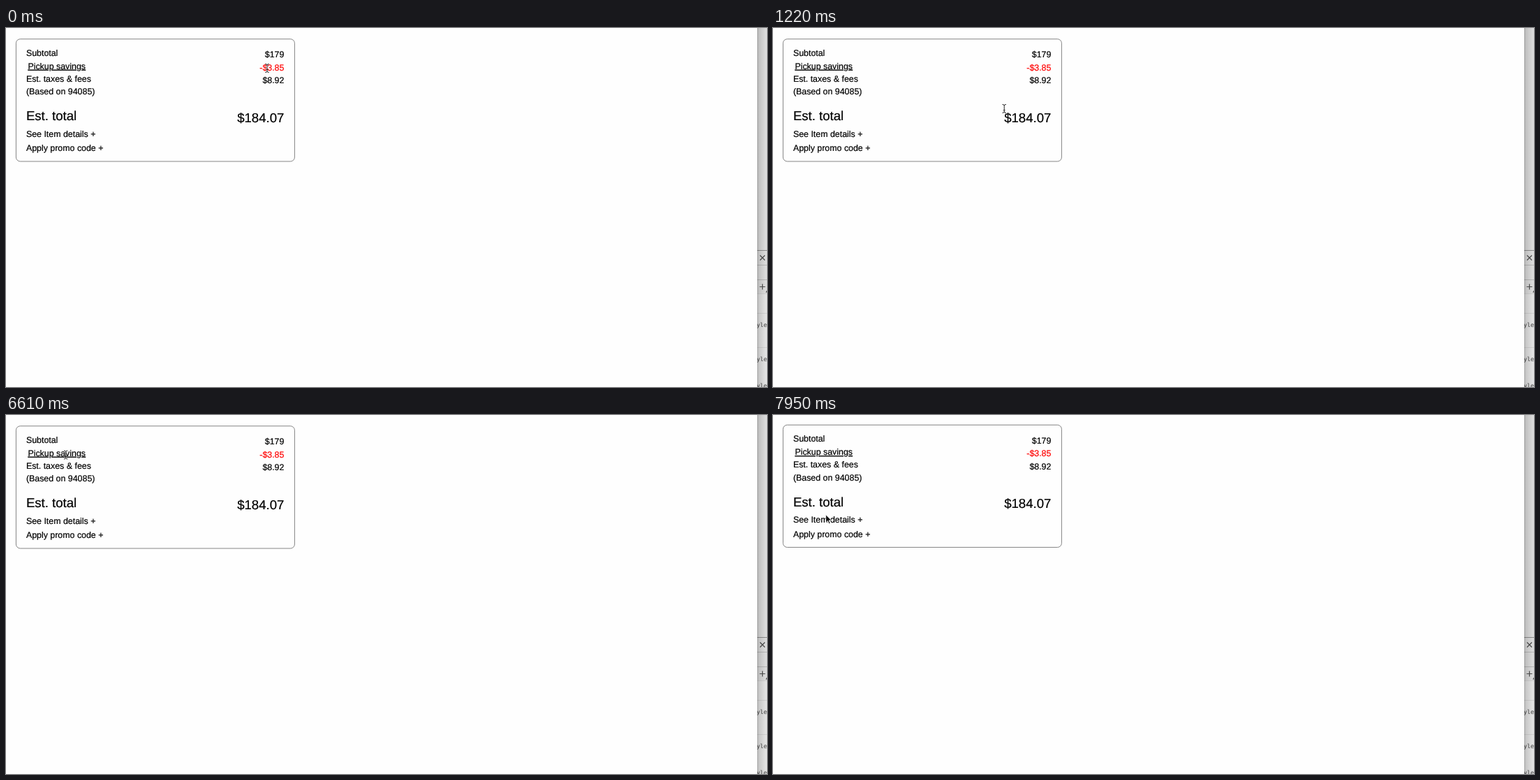
Write an HTML page that moves like this. It is 1090x514 px and loops after 8 s.

```html
<!DOCTYPE html>
<html lang="en">
<head>
<meta charset="utf-8">
<title>Order summary</title>
<style>
html, body { margin: 0; width: 100%; height: 100%; overflow: hidden; background: #fefefe; }
svg { display: block; }
text { font: 12.4px "Liberation Sans", Arial, sans-serif; text-rendering: geometricPrecision; white-space: pre; }
#card text { stroke: currentColor; stroke-width: .2; }
#card .saving { fill: #f00; color: #f00; }
.big { font-size: 18.6px; }
.end { text-anchor: end; }
.mid { text-anchor: middle; fill: #fff; }
.code { font: 8.4px "DejaVu Sans Mono", monospace; fill: #444; }
</style>
</head>
<body>
<svg width="1090" height="514" viewBox="0 0 1090 514">
  <defs>
    <linearGradient id="shade">
      <stop offset="0" stop-opacity=".34"/>
      <stop offset=".15" stop-opacity=".2"/>
      <stop offset="1" stop-opacity=".07"/>
    </linearGradient>
  </defs>
  <rect width="1090" height="514" fill="#fefefe"/>

  <!-- window behind the page -->
  <g>
    <rect x="1076" width="14" height="380" fill="#f0f0f0"/>
    <rect x="1076" y="380" width="14" height="134" fill="#f8f8f8"/>
    <path d="M1076 318.5h14" stroke="#999"/>
    <path d="M1076 339.5h14M1076 360.5h14" stroke="#c8c8c8"/>
    <path d="M1076 380.5h14M1076 408.5h14M1076 457.5h14" stroke="#e4e4e4"/>
    <path d="M1080 325.5l7 7m0-7l-7 7M1079.5 370.5h8m-4-4v8" stroke="#555" stroke-width="1.2"/>
    <path d="M1090 375.5v3h-2z" fill="#555"/>
    <text class="code" x="1075" y="428">yle</text>
    <text class="code" x="1075" y="476.5">yle</text>
    <text class="code" x="1075" y="514.5">yle</text>
    <rect x="1076" width="14" height="514" fill="url(#shade)"/>
  </g>
  <rect x="1060" width="16" height="514" fill="#fefefe"/>

  <g id="card">
    <rect x="14.4" y="15.8" width="399" height="175.2" rx="6" fill="none" stroke="#777" stroke-width=".9"/>
    <text x="28.9" y="40">Subtotal</text>
    <text x="31.4" y="58.7" text-decoration="underline">Pickup savings</text>
    <text x="28.9" y="77">Est. taxes &amp; fees</text>
    <text x="28.9" y="95.4">(Based on 94085)</text>
    <text x="28.9" y="132.3" class="big">Est. total</text>
    <text x="28.9" y="155.5">See Item details +</text>
    <text x="28.9" y="176.4">Apply promo code +</text>
    <g class="end">
      <text x="398.4" y="42.3">$179</text>
      <text x="398.4" y="61" class="saving">-$3.85</text>
      <text x="398.4" y="79.4">$8.92</text>
      <text x="398.4" y="134.9" class="big">$184.07</text>
    </g>
  </g>

  <g id="tip">
    <rect x="71" y="63" width="184.3" height="49.3" rx="4.5" fill="#808080"/>
    <text class="mid" x="163" y="79">Picking up your order in store</text>
    <text class="mid" x="163" y="92.8">helps cut cost, and we pass the</text>
    <text class="mid" x="163" y="106.6">saving on to you</text>
  </g>

  <g id="beam" fill="none">
    <path d="M0-5V5" stroke="#fff" stroke-opacity=".5" stroke-width="2.4"/>
    <path d="M-2.7-6Q0-6 0-4.5Q0-6 2.7-6M0-4.5V4.5M-2.7 6Q0 6 0 4.5Q0 6 2.7 6M-1.3 2.2H1.3" stroke="#222"/>
  </g>
  <path id="arrow" d="M0 0V11.2L2.7 8.8L4.6 13L6.5 12.2L4.7 8.1H8.2Z" fill="#111" stroke="#fff" stroke-width=".8"/>
</svg>
<script>
const LOOP = 8000, SCROLL = 0.78;
const [card, tip, beam, arrow] = ["card", "tip", "beam", "arrow"].map(id => document.getElementById(id));

// start time, pointer x, y, pointer kind
const steps = [
  [0, 374, 57.5, beam],
  [150, 371.3, 77.5, beam],
  [330, 371, 111.5, arrow],
  [470, 371.5, 119.5, beam],
  [620, 371.5, 124.5, beam],
  [770, 371, 131.5, beam],
  [920, 370.4, 131.5, beam],
  [1220, 331.2, 115.5, beam],
  [1370, 95, 57.5, beam],
  [1510, 85.5, 56, beam],
  [1810, 85.6, 57, beam],
  [7060, 77.5, 115.5, arrow],
  [7210, 75, 142, arrow],
  [7360, 75.6, 142.8, arrow]
];
const show = (el, on) => el.setAttribute("visibility", on ? "visible" : "hidden");
const move = (el, x, y) => el.setAttribute("transform", `translate(${x} ${y})`);

const start = performance.now();
function draw() {
  const t = (performance.now() - start) % LOOP;
  const [, x, y, pointer] = steps.findLast(s => s[0] <= t);
  show(beam, pointer === beam);
  show(arrow, pointer === arrow);
  move(pointer, x, y);
  show(tip, t >= 3160 && t < 6610);
  move(card, 0, -SCROLL * ((t >= 7800) + (t >= 7950)));
  requestAnimationFrame(draw);
}
draw();
</script>
</body>
</html>
```
